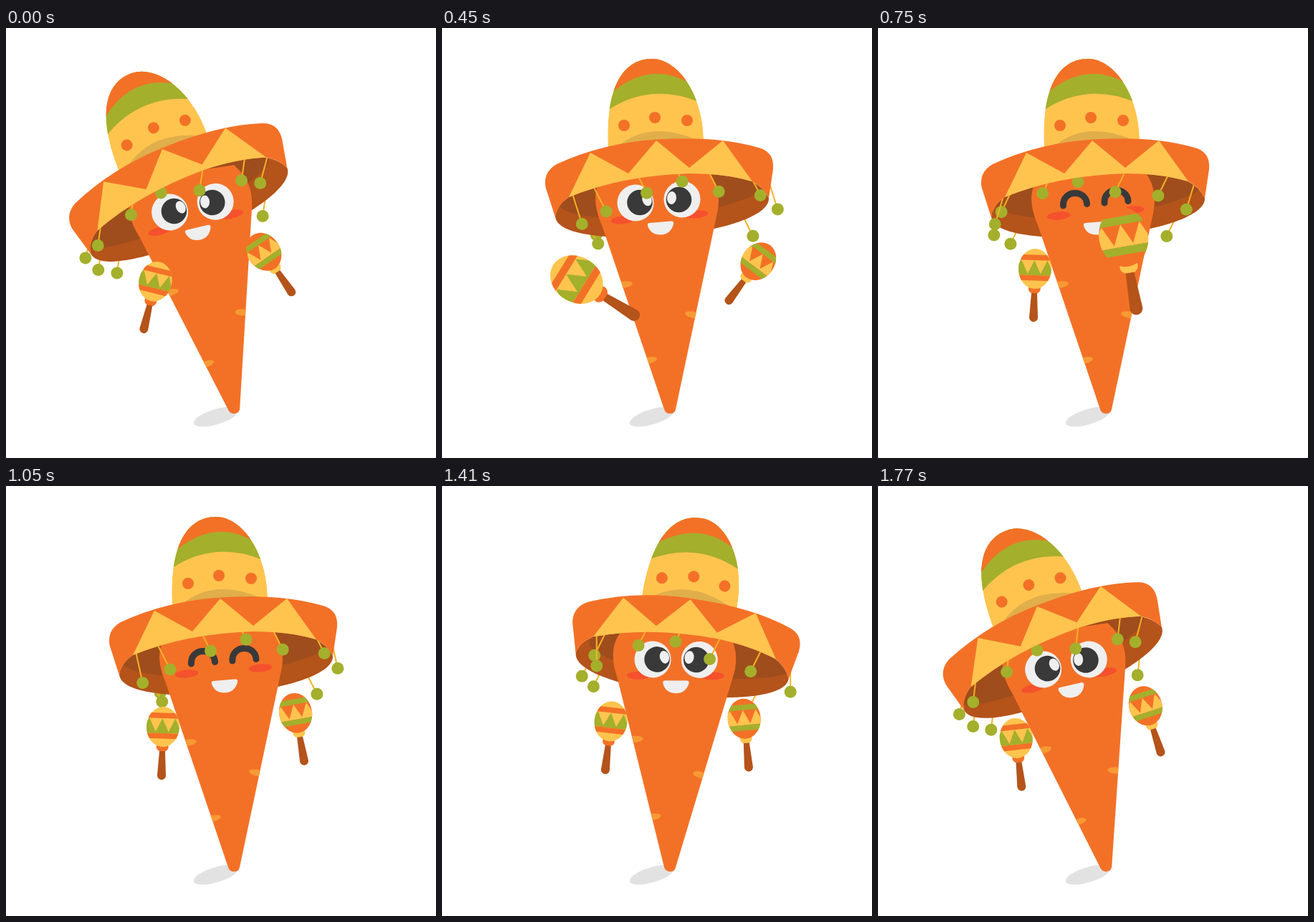
Write an HTML page with a canvas that moves like this. It is 600 px wide and 600 px high and loops after 1800 ms.

```html
<!DOCTYPE html>
<html lang="en">
<head>
<meta charset="utf-8">
<title>Dancing carrot</title>
<style>
html, body { margin: 0; width: 100%; height: 100%; overflow: hidden; background: #fff; }
canvas { display: block; width: 600px; height: 600px; }
</style>
</head>
<body>
<canvas id="stage" width="600" height="600"></canvas>
<script>
const ctx = document.getElementById('stage').getContext('2d');
const LOOP = 1800, STEP = 30, BEAT = 600, RAD = Math.PI / 180;
const ORANGE = '#f37127', YELLOW = '#ffc44e', GREEN = '#a4af2c', BROWN = '#b4531a',
  SHADE = '#9f4d1c', WHITE = '#efefef', DARK = '#393939', CHEEK = '#f5512d',
  MARK = '#f79a33', STRING = '#f3b328', OCHRE = '#e0ae4a';

const crown = new Path2D('M232 170C227 92 248 43 293 43C330 43 366 95 365 162Z');
const brimEdge = 'Q395 203 345 203Q250 206 177 236';
const brim = new Path2D('M158 264L144.500 222Q141 201 160 190Q225 160 300 155.500Q385 150 442 167' +
  'Q464 173 462 197L456 237Q448 222 433 214' + brimEdge + 'Q160 248 158 264Z');
const zigzag = new Path2D('M177 236L207 174L260 203L299 157L345 195L392 157L433 214' + brimEdge + 'Z');
const inside = new Path2D('M158 263Q160 248 177 236Q250 206 345 203Q395 203 432 214Q448 222 456 237' +
  'C458 264 380 286 300 291C225 295 160 288 158 263Z');
const body = new Path2D('M310 532L223 275Q199 220 240 195L368 195Q392 222 384 258L326 532' +
  'Q325 538 318 538Q312 538 310 532Z');
const mouth = new Path2D('M290 272L320 269.500Q324 269.500 323 274Q319 288 305 288.500Q291 288.500 287 276Q286 272 290 272Z');
const closedEye = new Path2D('M258.500 248C257 226 290 224 291.500 245.500');

// hanging pompoms: anchor x, anchor y, string length
const backPoms = [[418, 259, 35], [188, 235, 60], [201, 268, 37]];
const frontPoms = [[200, 199, 64], [257, 174, 63], [306.5, 158, 63], [358, 173, 62], [417, 180, 60]];
const sidePoms = [[179, 222, 54], [449, 192, 64]];

// eased value between [time, value] keys
function ease(t, keys) {
  if (t <= keys[0][0]) return keys[0][1];
  for (let i = 1; i < keys.length; i++) {
    const [a, from] = keys[i - 1], [b, to] = keys[i];
    if (t < b) {
      const u = (t - a) / (b - a);
      return from + (to - from) * u * u * (3 - 2 * u);
    }
  }
  return keys[keys.length - 1][1];
}

function fill(path, color) {
  ctx.fillStyle = color;
  ctx.fill(path);
}

function oval(x, y, rx, ry, color, tilt = 0) {
  ctx.fillStyle = color;
  ctx.beginPath();
  ctx.ellipse(x, y, rx, ry, tilt * RAD, 0, 7);
  ctx.fill();
}

function within(place, draw) {
  ctx.save();
  place();
  draw();
  ctx.restore();
}

function turn(x, y, deg) {
  ctx.translate(x, y);
  ctx.rotate(deg * RAD);
}

function drawPoms(poms, hat, swing) {
  const c = Math.cos(hat.turn * RAD), s = Math.sin(hat.turn * RAD), a = swing * RAD;
  for (const [px, py, len] of poms) {
    const dx = px - 299, dy = py - 157;
    const x = hat.x + dx * c - dy * s, y = hat.y + dx * s + dy * c;
    const ex = x - len * Math.sin(a), ey = y + len * Math.cos(a);
    ctx.strokeStyle = STRING;
    ctx.lineWidth = 2;
    ctx.beginPath();
    ctx.moveTo(x, y);
    ctx.lineTo(ex, ey);
    ctx.stroke();
    oval(ex, ey, 8.5, 8.5, GREEN);
  }
}

function drawInside(sway) {
  fill(inside, BROWN);
  ctx.clip(inside);
  oval(309 + 20 * sway, 229, 148, 33, SHADE, -6);
}

function drawHat() {
  within(() => ctx.clip(crown), () => {
    fill(crown, YELLOW);
    fill(new Path2D('M229 116Q290 75 358 103L358 30L229 30Z'), GREEN);
    fill(new Path2D('M237 90Q291 45 346 77L346 30L237 30Z'), ORANGE);
    fill(new Path2D('M244 166Q290 127 358 157L358 180L244 180Z'), OCHRE);
    oval(254, 136, 8, 8, ORANGE);
    oval(297, 125, 8, 8, ORANGE);
    oval(342, 129, 8, 8, ORANGE);
  });
  fill(brim, ORANGE);
  fill(zigzag, YELLOW);
}

function drawBody() {
  fill(body, ORANGE);
  ctx.clip(body);
  oval(254, 358, 12, 4.5, MARK, -8);
  oval(350, 400, 11, 4.5, MARK, 10);
  oval(288, 464, 12, 4.5, MARK, -12);
}

function drawFace(closed) {
  const drop = closed ? 0 : 6;
  oval(252, 262 + drop, 16.5, 5.5, CHEEK, -5);
  oval(355, 254 + drop, 16.5, 5.5, CHEEK, -5);
  fill(mouth, WHITE);
  if (closed) {
    ctx.strokeStyle = DARK;
    ctx.lineWidth = 9;
    ctx.lineCap = 'round';
    ctx.stroke(closedEye);
    ctx.translate(57.5, -4);
    ctx.stroke(closedEye);
  } else {
    oval(270, 244, 25.5, 25.5, WHITE);
    oval(276, 243.5, 17.8, 17.8, DARK);
    oval(286, 239.5, 6.5, 9, WHITE, -19);
    oval(335, 239, 25.5, 25.5, WHITE);
    oval(330.5, 239.5, 17.8, 17.8, DARK);
    oval(320.5, 237, 6.5, 9, WHITE, 6);
  }
}

// origin at the grip, head upwards
function drawMaraca(base, stripe, zig, collar) {
  oval(0, -20, 8.5, 7, collar);
  fill(new Path2D('M-4 -14L4 -14L6 20A6 6 0 0 1 -6 20Z'), BROWN);
  ctx.translate(0, -48);
  const head = new Path2D();
  head.ellipse(0, 0, 23, 28, 0, 0, 7);
  fill(head, base);
  ctx.clip(head);
  fill(new Path2D('M-25 9V-5L-19 -12L-10 7L-1 -12L8 7L17 -12L25 5V9Z'), zig);
  ctx.fillStyle = stripe;
  ctx.fillRect(-25, -19.5, 50, 7.5);
  ctx.fillRect(-25, 9, 50, 7.5);
}

function draw(t) {
  const beat = t % BEAT;
  const sway = -Math.cos(2 * Math.PI * beat / BEAT);
  const lean = 8.3 * sway - 0.2 * sway * sway;
  const hat = {
    x: 299 + 81 * sway,
    y: 157 - 3.2 * sway + 8.8 * sway * sway,
    turn: 19.6 * sway + 1.1 * sway * sway
  };
  const swing = ease(beat, [[-15, 8], [187, 27.5], [450, -27], [585, 8], [787, 27.5]]);
  const sideSwing = ease(t, [[0, 15], [150, 17], [470, -18], [750, 17], [1050, -12.5],
    [1300, 16], [1520, -16], [1780, 15]]);
  const shake = ease(t, [[0, -0.34], [210, 1], [480, 1], [660, 0]]);
  const leftGrow = ease(t, [[0, 0], [300, 0.57], [690, 0]]);
  const rightGrow = ease(t, [[450, 0], [750, 0.49], [1050, 0]]);
  const closed = t >= 600 && t < 1200;

  const onBody = () => { turn(318, 530, lean); ctx.translate(-318, -530); };
  const onFace = () => { onBody(); ctx.translate(0, 2.7 * sway * sway); };
  const onHat = () => { turn(hat.x, hat.y, hat.turn); ctx.translate(-299, -157); };
  const inHand = (x, y, deg, grow) => () => {
    onBody();
    turn(x, y, deg);
    ctx.scale(1 + grow, 1 + grow);
  };

  ctx.fillStyle = '#fff';
  ctx.fillRect(0, 0, 600, 600);
  oval(293, 542.5, 32.5, 10.5, '#e2e2e2', -17);
  drawPoms(backPoms, hat, swing);
  within(onHat, () => drawInside(sway));
  within(onBody, drawBody);
  within(onFace, () => drawFace(closed));
  drawPoms(frontPoms, hat, swing);
  drawPoms(sidePoms, hat, sideSwing);
  within(onHat, drawHat);
  within(inHand(217.6 + 70 * leftGrow, 384 + 5 * leftGrow, 1.7 - 60 * shake, leftGrow),
    () => drawMaraca(YELLOW, ORANGE, GREEN, ORANGE));
  within(inHand(412.5 - 117 * rightGrow, 364 - 4 * rightGrow, -10.1 + 47 * shake, rightGrow),
    () => drawMaraca(ORANGE, GREEN, YELLOW, YELLOW));
}

const start = performance.now();
function tick() {
  const t = (performance.now() - start) % LOOP;
  draw(Math.floor(t / STEP) * STEP);
  requestAnimationFrame(tick);
}
tick();
</script>
</body>
</html>
```
